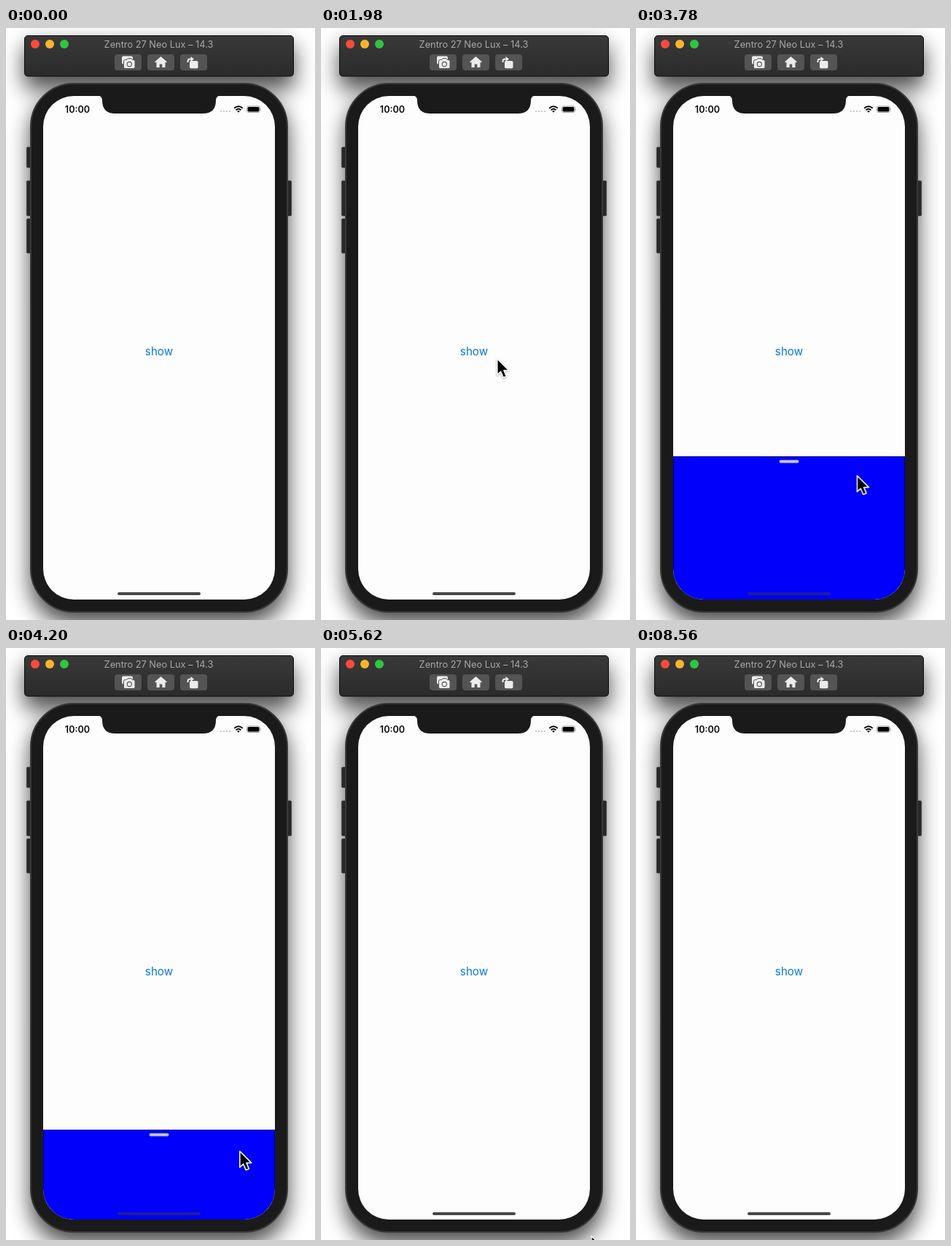
An HTML page that plays this animation: 424x810 px, repeating every 8.58 s.

```html
<!DOCTYPE html>
<html lang="en">
<head>
<meta charset="utf-8">
<title>Bottom sheet</title>
<style>
  html, body { margin: 0; width: 100%; height: 100%; overflow: hidden; background: #fff; }
  svg { display: block; width: 424px; height: 810px; }
  text { font-family: Inter, Roboto, "Liberation Sans", sans-serif; }
  .bezel { fill: #1a1a1a; }
  .key { fill: #282828; stroke: #3a3a3a; stroke-width: .6; }
  .icon { fill: #ececec; }
  .sheet { animation: sheet 8.58s infinite; }
  .home { animation: home 8.58s infinite; }
  .cursor { animation: cursor 8.58s infinite ease-in-out; }

  @keyframes sheet {
    0%, 26.8% { transform: translateY(785px); animation-timing-function: cubic-bezier(.2, .7, .2, 1); }
    32%, 36.8% { transform: translateY(442px); animation-timing-function: ease-in-out; }
    48.95% { transform: translateY(659px); animation-timing-function: ease-out; }
    53%, 57.5% { transform: translateY(704px); animation-timing-function: ease-in; }
    62.5%, 100% { transform: translateY(785px); }
  }
  /* the home bar fades while the sheet is behind it */
  @keyframes home {
    0%, 26.8%, 62.5%, 100% { fill: rgba(0, 0, 0, .72); }
    30%, 60% { fill: rgba(60, 60, 60, .5); }
  }
  @keyframes cursor {
    0%, 15% { transform: translate(440px, 540px); }
    23.08% { transform: translate(241px, 451px); }
    26%, 28% { transform: translate(218px, 443px); }
    36.13%, 36.8% { transform: translate(268px, 460px); }
    48.95% { transform: translate(320px, 687px); }
    53% { transform: translate(314px, 726px); }
    56.88%, 57.5% { transform: translate(307px, 730px); }
    62.5% { transform: translate(316px, 782px); }
    69%, 100% { transform: translate(440px, 830px); }
  }
</style>
</head>
<body>
<svg viewBox="0 0 424 810">
  <defs>
    <linearGradient id="bar" x2="0" y2="1">
      <stop offset="0" stop-color="#393939"/>
      <stop offset="1" stop-color="#2b2b2b"/>
    </linearGradient>
    <filter id="soft" filterUnits="userSpaceOnUse" x="-60" y="-60" width="544" height="960">
      <feGaussianBlur stdDeviation="15"/>
    </filter>
    <filter id="drop" x="-50%" y="-50%" width="200%" height="200%">
      <feDropShadow dx="0" dy="1" stdDeviation="1.2" flood-color="#000" flood-opacity=".4"/>
    </filter>
    <clipPath id="screen"><rect x="51" y="93" width="318" height="689" rx="42"/></clipPath>
  </defs>

  <rect width="424" height="810" fill="#fff"/>
  <g opacity=".7">
    <rect x="25" y="24" width="370" height="60" rx="6" filter="url(#soft)"/>
    <rect x="33" y="90" width="354" height="726" rx="58" filter="url(#soft)"/>
  </g>

  <!-- window bar -->
  <rect x="25.5" y="10.5" width="369" height="55.5" rx="4.5" fill="url(#bar)" stroke="#0a0a0a"/>
  <circle cx="40" cy="22" r="6" fill="#fc4a3c"/>
  <circle cx="60" cy="22" r="6" fill="#fdb42c"/>
  <circle cx="80" cy="22" r="6" fill="#2fc63f"/>
  <text x="209.5" y="27" font-size="12.8" text-anchor="middle" fill="#a8a8a8">Zentro 27 Neo Lux – 14.3</text>
  <g fill="#545454">
    <rect x="149" y="36" width="37" height="22" rx="4"/>
    <rect x="194" y="36" width="37" height="22" rx="4"/>
    <rect x="239" y="36" width="37" height="22" rx="4"/>
  </g>
  <g class="icon">
    <rect x="159" y="38.5" width="15" height="11" rx="2"/>
    <path stroke="#545454" d="M163.500 43.500h2l1.500-1.800h5l1.500 1.800h1.500q2 0 2 2v8q0 2-2 2h-11.500q-2 0-2-2v-8q0-2 2-2z"/>
    <circle cx="169.3" cy="49.5" r="3.1" fill="none" stroke="#545454" stroke-width="1.1"/>
    <path d="M212.500 39l8.300 7.300-1 1.200-1.300-1v7.500h-4.200v-4.500h-3.600v4.500h-4.200v-7.500l-1.300 1-1-1.200z"/>
    <rect x="252" y="45" width="11.500" height="10.200" rx="1.8"/>
    <path d="M248.500 47v-1.500q0-4 4-4h1v-2.500l4.500 3.500-4.500 3.500v-2.400h-1q-2 0-2 2v1.400z"/>
  </g>

  <!-- phone body -->
  <g class="key">
    <rect x="28.3" y="163" width="7" height="28" rx="1.5"/>
    <rect x="28.3" y="209" width="7" height="48" rx="1.5"/>
    <rect x="28.3" y="261" width="7" height="47" rx="1.5"/>
    <rect x="385" y="209" width="6.700" height="48" rx="1.5"/>
  </g>
  <rect class="bezel" x="34" y="76" width="352" height="723" rx="59" stroke="#383838" stroke-width="2"/>

  <!-- screen -->
  <g clip-path="url(#screen)">
    <rect x="51" y="93" width="318" height="689" fill="#fdfdfd"/>
    <text x="210" y="448" font-size="15.2" text-anchor="middle" fill="#0a78d8">show</text>
    <g class="sheet">
      <rect x="51.5" y=".5" width="317" height="345" fill="#0000fb" stroke="#0000a0"/>
      <rect x="196.5" y="4.8" width="27" height="4" rx="2" fill="#c9c9c9"/>
    </g>
    <rect class="home" x="153" y="772" width="114" height="4" rx="2"/>
  </g>
  <path class="bezel" d="M126 92.500q6 .5 6 6.500v0q0 18 18 18h120q18 0 18-18v0q0-6 6-6.500z"/>

  <!-- status bar -->
  <text x="98" y="115.6" font-size="12.6" font-weight="600" text-anchor="middle" fill="#080808">10:00</text>
  <g fill="#bcbcbc">
    <circle cx="295" cy="114" r="1.1"/>
    <circle cx="299" cy="114" r="1.1"/>
    <circle cx="303" cy="114" r="1.1"/>
    <circle cx="307" cy="114" r="1.1"/>
  </g>
  <g fill="none" stroke="#080808" stroke-width="1.9">
    <path d="M313.200 109.700q5.800-4.800 11.600 0"/>
    <path d="M315.500 112.200q3.500-2.800 7 0"/>
  </g>
  <path d="M317.100 113.700q1.900-1.400 3.800 0l-1.900 2.100z" fill="#080808"/>
  <rect x="330.5" y="106.9" width="18" height="8.6" rx="2.5" fill="none" stroke="#8c8c8c" stroke-width=".8"/>
  <rect x="331.6" y="108" width="15.800" height="6.400" rx="1.6" fill="#050505"/>
  <path d="M349.600 109.700q1.500 1.500 0 3z" fill="#8c8c8c"/>

  <!-- pointer -->
  <g class="cursor">
    <path filter="url(#drop)" d="M.8 1.500V23.500L5.600 19 9.200 27.300 13.400 25.600 9.900 17.400H16.700Z"
      fill="#050505" stroke="#fdfdfd" stroke-width="1.5" stroke-linejoin="round"/>
  </g>
</svg>
</body>
</html>
```
